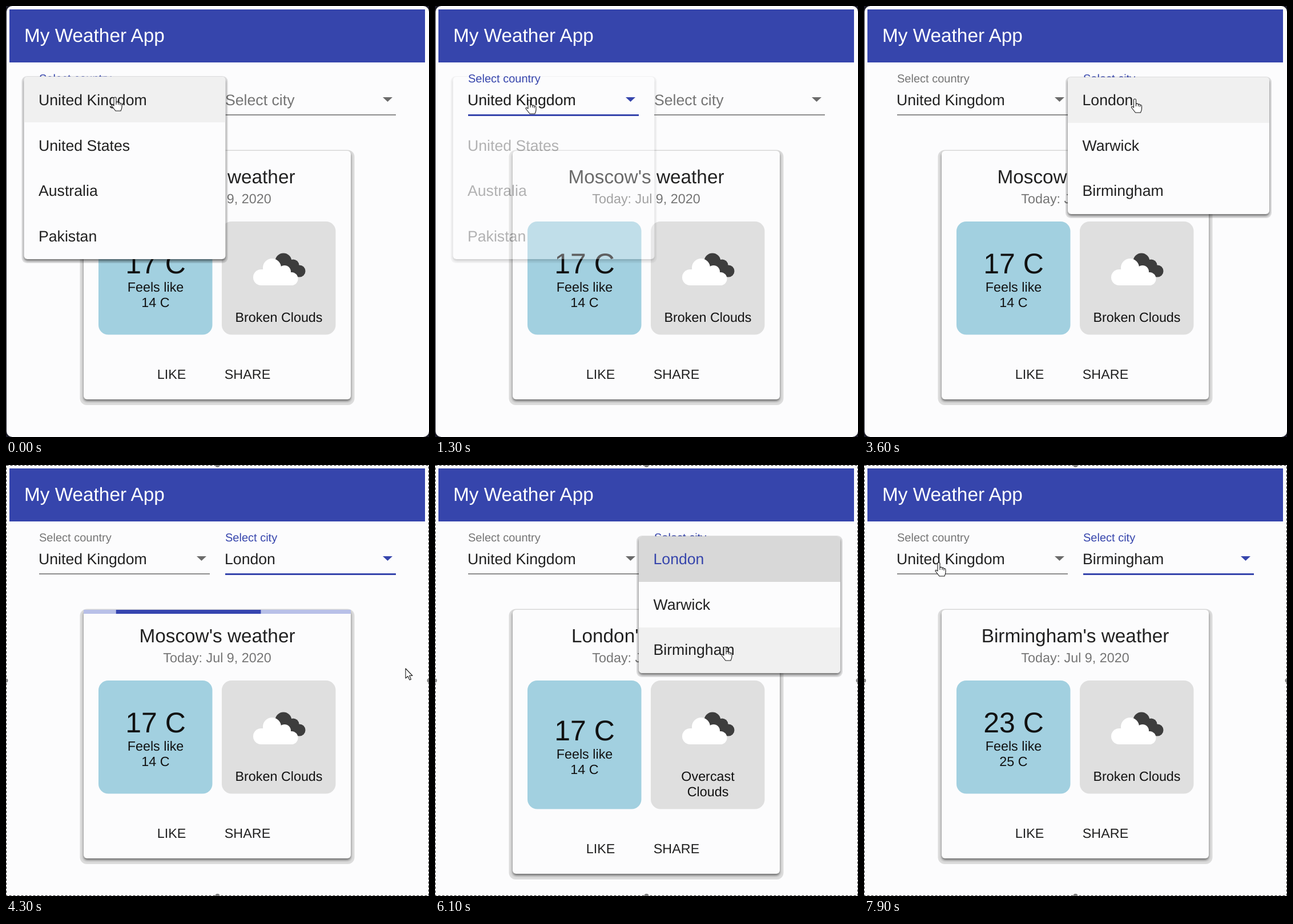
Write an HTML page that moves like this. It is 741 by 756 pixels and loops after 8000 ms.

```html
<!DOCTYPE html>
<html lang="en">
<head>
<meta charset="utf-8">
<title>My Weather App</title>
<style>
  html, body { margin: 0; width: 100%; height: 100%; overflow: hidden; background: #1b1b27; }
  svg { display: block; width: 741px; height: 756px; font-family: "Liberation Sans", Arial, sans-serif; text-rendering: geometricPrecision; }
  text { fill: #212121; }
  .mid { text-anchor: middle; }
  .body { font-size: 23.33px; }
  .value { font-size: 26.67px; }
  .title { font-size: 33.33px; }
  .temp { font-size: 50px; fill: #000; }
  .dark text { fill: #111; }
  .menu { transform-box: view-box; }
</style>
</head>
<body>
<svg viewBox="0 0 741 756">
  <defs>
    <filter id="soft" x="-10%" y="-10%" width="120%" height="120%"><feGaussianBlur stdDeviation="2"/></filter>
  </defs>

  <rect x="1" width="740" height="756" rx="10" fill="#fcfcfd"/>
  <rect x="6" y="6" width="728" height="93" fill="#3645ac"/>
  <text class="title" x="32" y="63" style="fill:#fff">My Weather App</text>

  <g id="card">
    <rect id="halo" x="129.500" y="252.500" width="481" rx="12" fill="#dcdcdc"/>
    <rect id="shade" x="136" y="257" width="468" rx="6" fill="#000" opacity=".5" filter="url(#soft)"/>
    <rect id="paper" x="136" y="254" width="468" rx="6" fill="#fcfcfd"/>
    <g id="progress">
      <rect x="136" y="254" width="468" height="7" fill="#b8c0e8"/>
      <rect id="bar" y="254" height="7" fill="#3645b0"/>
    </g>
    <text id="title" class="title mid" x="370" y="311"></text>
    <text class="body mid" x="370" y="346" style="fill:#757575">Today: Jul 9, 2020</text>
    <rect class="tile" x="162" y="378" width="199.5" rx="17" fill="#a2d0e0"/>
    <rect class="tile" x="378" y="378" width="199.5" rx="17" fill="#dfdfdf"/>
    <g id="reading" class="body mid dark">
      <text id="temp" class="temp" x="262" y="469"></text>
      <text x="262" y="501">Feels like</text>
      <text id="feels" x="262" y="528"></text>
    </g>
    <g fill="#3d3d3d">
      <circle cx="486" cy="448" r="14.5"/>
      <circle cx="503" cy="455" r="10.5"/>
      <circle cx="514" cy="465" r="10.5"/>
      <path d="M484 450H510V475.500H484Z"/>
    </g>
    <g fill="#fff">
      <circle cx="447" cy="476" r="14"/>
      <circle cx="466" cy="459" r="16"/>
      <circle cx="488" cy="466" r="11"/>
      <circle cx="500" cy="478.500" r="11.500"/>
      <path d="M447 462H493L500 470V490H447Z"/>
    </g>
    <g class="body mid dark">
      <text id="sky1" x="478" y="554"></text>
      <text id="sky2" x="478" y="581"></text>
    </g>
    <g id="buttons" class="body mid">
      <text x="290" y="654">LIKE</text>
      <text x="423" y="654">SHARE</text>
    </g>
  </g>

  <g id="fields"></g>
  <g id="menus"></g>

  <g id="marquee">
    <rect x=".5" y=".5" width="740" height="755" fill="none" stroke="#222" stroke-dasharray="4 3"/>
    <g fill="#808080">
      <circle cx="370.500" cy="0" r="4"/>
      <circle cx="370.500" cy="756" r="4"/>
      <circle cx="0" cy="378" r="3.500"/>
      <circle cx="741" cy="378" r="3.500"/>
    </g>
  </g>

  <g id="cursor" fill="#fff" stroke="#1a1a1a" stroke-width="1.1" stroke-linejoin="round">
    <path id="hand" d="M5 15V2Q5 0 7 0T9 2V9Q11 7 13 9.500Q15 8.500 16 10.500Q19 10 19 13V17Q19 20 17 24H8L1 15Q1 11.500 5 15ZM13 9.500V13M16 10.500V14M9 9V13"/>
    <path id="arrow" d="M0 0V17L4 13.500L7 20L9.500 19L6.800 12.500H12Z"/>
  </g>
</svg>

<script>
const LOOP = 8000, STEP = 100;
const BLUE = '#3645ac', GREY = '#757575';
const $ = id => document.getElementById(id);
const clamp = v => Math.max(0, Math.min(1, v));
const mix = (a, b, p) => a + (b - a) * p;
const ease = p => p * p * (3 - 2 * p);
const show = (el, on) => el.style.display = on ? '' : 'none';

function add(parent, tag, attrs, label) {
  const el = document.createElementNS('http://www.w3.org/2000/svg', tag);
  for (const key in attrs) el.setAttribute(key, attrs[key]);
  if (label) el.textContent = label;
  return parent.appendChild(el);
}

function makeField(x, label) {
  const g = add($('fields'), 'g', {});
  const parts = {
    label: add(g, 'text', { x }, label),
    value: add(g, 'text', { x: x - 1, y: 174, class: 'value' }),
    line: add(g, 'rect', { x, y: 190, width: 299 }),
    caret: add(g, 'path', { d: `M${x + 276} 160h17l-8.500 8z` })
  };
  return (value, focused, shrink) => {
    parts.label.setAttribute('y', mix(174, 134, shrink));
    parts.label.style.fontSize = mix(26.67, 20, shrink) + 'px';
    parts.label.style.fill = focused ? BLUE : GREY;
    parts.value.textContent = value;
    parts.line.setAttribute('height', focused ? 3 : 2);
    parts.line.setAttribute('fill', focused ? BLUE : '#8c8c8c');
    parts.caret.setAttribute('fill', focused ? BLUE : '#6b6b6b');
  };
}

function makeMenu(id, x, y, items) {
  const h = items.length * 80;
  const box = { x, y, width: 353, height: h, rx: 6 };
  const clip = add(add(document.querySelector('defs'), 'clipPath', { id }), 'rect', box).parentNode;
  const g = add($('menus'), 'g', { class: 'menu' });
  add(g, 'rect', { x: x - 4, y: y - 1, width: 361, height: h + 8, rx: 9, fill: '#000', opacity: .1 });
  add(g, 'rect', { ...box, y: y + 3, fill: '#000', opacity: .5, filter: 'url(#soft)' });
  add(g, 'rect', { ...box, fill: '#fcfcfd' });
  const rows = add(g, 'g', { 'clip-path': `url(#${clip.id})` });
  const list = items.map((name, i) => ({
    name,
    back: add(rows, 'rect', { x, y: y + i * 80, width: 353, height: 80 }),
    text: add(rows, 'text', { x: x + 25.5, y: 174 + i * 79.7, class: 'value' }, name)
  }));
  g.style.transformOrigin = `${x + 176}px ${y + 40}px`;
  return {
    x, y, h,
    draw(opacity, scale, hover, selected) {
      show(g, opacity > 0);
      g.style.opacity = opacity;
      g.style.transform = `scale(${scale})`;
      list.forEach((row, i) => {
        const chosen = row.name === selected;
        row.back.setAttribute('fill', chosen ? '#d8d8d8' : i === hover ? '#f0f0f0' : 'none');
        row.text.style.fill = chosen ? BLUE : '#212121';
      });
    }
  };
}

const drawCountry = makeField(58, 'Select country');
const drawCity = makeField(384, 'Select city');
const countryMenu = makeMenu('clipA', 31.5, 124, ['United Kingdom', 'United States', 'Australia', 'Pakistan']);
const cityMenu = makeMenu('clipB', 357, 125, ['London', 'Warwick', 'Birmingham']);

// [menu, opens, closes]
const sessions = [
  [countryMenu, -1000, 1100],
  [cityMenu, 2700, 3800],
  [cityMenu, 5400, 6500]
];

// [time, x, y] of the pointer
const path = [
  [0, 184, 160], [900, 184, 160], [1300, 158, 165], [1700, 162, 165],
  [2500, 510, 158], [2900, 510, 158], [3400, 470, 163], [3800, 465, 163],
  [4300, 700, 357], [4800, 700, 350], [5300, 530, 163], [5500, 525, 163],
  [6100, 501, 319], [6500, 501, 321], [7100, 667, 320], [7300, 660, 316], [7900, 124, 171]
];

// [from, name, temperature, feels like, sky lines]
const reports = [
  [0, 'Moscow', 17, 14, 'Broken Clouds', ''],
  [4500, 'London', 17, 14, 'Overcast', 'Clouds'],
  [7200, 'Birmingham', 23, 25, 'Broken Clouds', '']
];
const loads = [[3900, 4500], [6620, 7200]];

function pointerAt(t) {
  const i = path.findIndex(p => p[0] > t);
  if (i < 0) return path[path.length - 1].slice(1);
  const [a, b] = [path[i - 1], path[i]];
  const p = ease((t - a[0]) / (b[0] - a[0]));
  return [mix(a[1], b[1], p), mix(a[2], b[2], p)];
}

function bezier(x1, y1, x2, y2, x) {
  const curve = (a, b, s) => 3 * (1 - s) ** 2 * s * a + 3 * (1 - s) * s * s * b + s ** 3;
  let lo = 0, hi = 1;
  for (let i = 0; i < 20; i++) {
    const s = (lo + hi) / 2;
    if (curve(x1, x2, s) < x) lo = s; else hi = s;
  }
  return curve(y1, y2, lo);
}

function drawMenus(t, x, y, city) {
  let open = false, closing = false;
  for (const menu of [countryMenu, cityMenu]) {
    const live = sessions.find(s => s[0] === menu && t > s[1] && t < s[2] + 300);
    if (!live) { menu.draw(0, 1); continue; }
    const grow = clamp((t - live[1]) / 300);
    const fade = 1 - clamp((t - live[2]) / 300);
    const inside = x > menu.x && x < menu.x + 353 && y > menu.y - 1 && y < menu.y + menu.h;
    const row = inside ? Math.floor((y - menu.y) / 80) : -1;
    menu.draw(Math.min(grow, fade), mix(.75, 1, ease(grow)), fade < 1 ? -1 : row, menu === cityMenu ? city : '');
    if (fade < 1) closing = true;
    else if (inside) open = true;
  }
  // A closing menu fades out beneath the fields.
  $(closing ? 'menus' : 'fields').after($(closing ? 'fields' : 'menus'));
  return open;
}

function drawCard(t) {
  const [, name, temp, feels, sky1, sky2] = reports.filter(r => r[0] <= t).pop();
  const extra = sky2 ? 27 : 0;
  $('title').textContent = name + "'s weather";
  $('temp').textContent = temp + ' C';
  $('feels').textContent = feels + ' C';
  $('sky1').textContent = sky1;
  $('sky2').textContent = sky2;
  $('halo').setAttribute('height', 447.5 + extra);
  for (const id of ['shade', 'paper']) $(id).setAttribute('height', 436 + extra);
  document.querySelectorAll('.tile').forEach(el => el.setAttribute('height', 198.5 + extra));
  $('reading').setAttribute('transform', `translate(0 ${extra / 2})`);
  $('buttons').setAttribute('transform', `translate(0 ${extra})`);

  const load = loads.find(l => t >= l[0] && t < l[1]);
  show($('progress'), load);
  if (load) {
    const p = bezier(.65, .815, .735, .395, (t - load[0]) / 1260);
    const left = clamp(-.35 + 1.35 * p), right = clamp(1.9 * p);
    $('bar').setAttribute('x', 136 + 468 * left);
    $('bar').setAttribute('width', 468 * Math.max(0, right - left));
  }
}

function draw(t) {
  const city = t < 3900 ? '' : t < 6600 ? 'London' : 'Birmingham';
  const onCity = t >= 2600;
  drawCountry('United Kingdom', !onCity, 1);
  drawCity(city, onCity, ease(clamp((t - 2700) / 200)));
  drawCard(t);

  const [x, y] = pointerAt(t);
  const tip = x + 7;
  const overItem = drawMenus(t, tip, y, city);
  const overField = y > 140 && y < 192 && (tip > 58 && tip < 357 || tip > 384 && tip < 683);
  $('cursor').setAttribute('transform', `translate(${x} ${y})`);
  show($('hand'), overItem || overField);
  show($('arrow'), !(overItem || overField));

  const framed = t >= 4000;
  show($('marquee'), framed);
  document.body.style.background = framed ? '#fcfcfd' : '';
}

function tick() {
  draw(Math.floor(performance.now() % LOOP / STEP) * STEP);
  requestAnimationFrame(tick);
}
tick();
</script>
</body>
</html>
```
